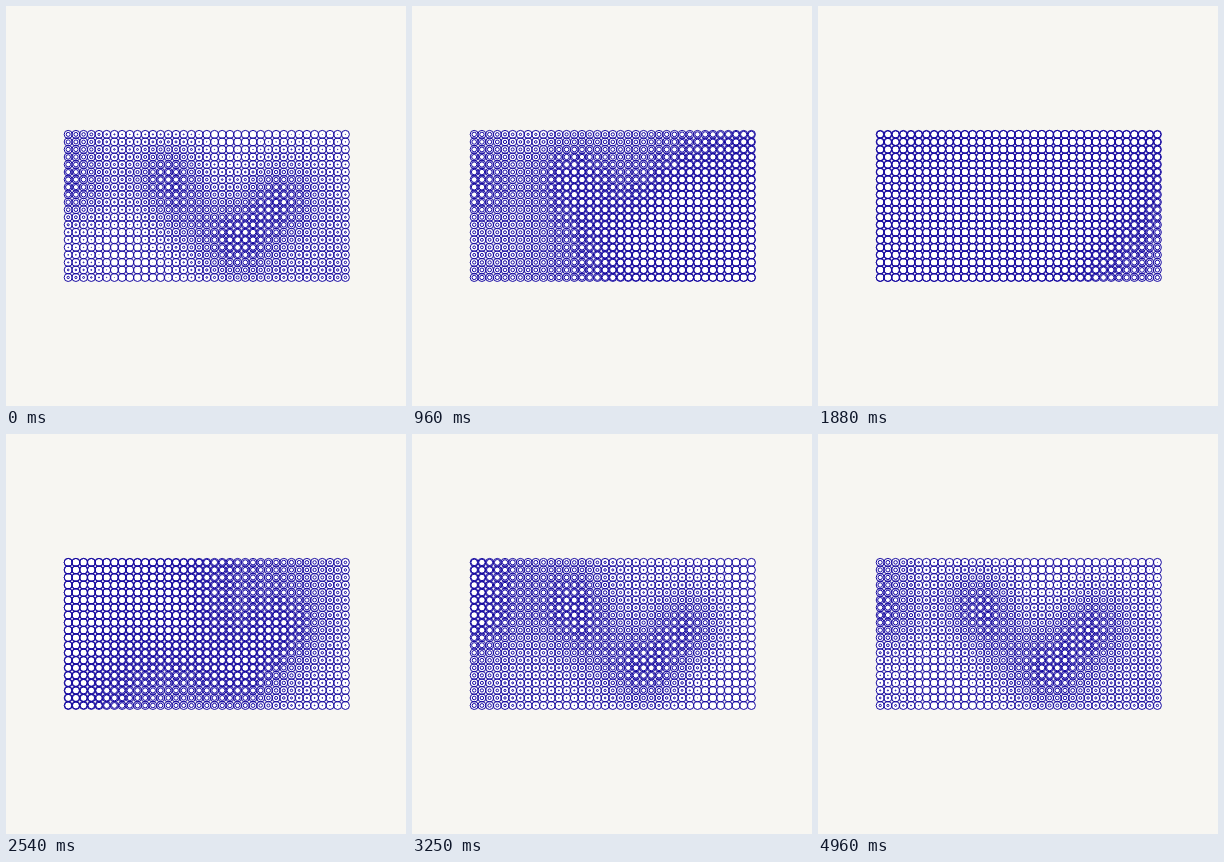
An HTML page with a canvas that plays this animation: 400 px wide and 400 px high, repeating every 5000 ms.

```html
<!DOCTYPE html>
<html lang="en">
<head>
<meta charset="utf-8">
<title>Ring field</title>
<style>
  html, body { margin: 0; width: 100%; height: 100%; overflow: hidden; background: #f7f6f2; }
  canvas { display: block; width: 400px; height: 400px; }
</style>
</head>
<body>
<canvas id="stage" width="400" height="400"></canvas>
<script>
const ctx = document.getElementById('stage').getContext('2d');
const TAU = Math.PI * 2;
const LOOP = 5000;
const COLS = 37, ROWS = 20;
const LEFT = 62.2, TOP = 128.4, DX = 7.7, DY = 7.53;
const RADIUS = 4, REST_MIN = -0.4, REST_MAX = 3, SPREAD = 29;

// Soft hills of the resting ring size
const hills = [
  { x: 64, y: 184, h: 2.8 },
  { x: 64, y: 122, h: 2 },
  { x: 62, y: 296, h: 2.2 },
  { x: 160, y: 169, h: 2.8 },
  { x: 182, y: 215, h: 1.4 },
  { x: 234, y: 239, h: 2.8 },
  { x: 276, y: 191, h: 2.8 }
];

function restSize(x, y) {
  const sum = hills.reduce((total, p) => {
    const d = Math.hypot(x - p.x, y - p.y) / SPREAD;
    return total + p.h * Math.exp(-d * d / 2);
  }, REST_MIN);
  return Math.min(sum, REST_MAX);
}

const cells = [];
for (let j = 0; j < ROWS; j++) {
  for (let i = 0; i < COLS; i++) {
    const x = LEFT + i * DX, y = TOP + j * DY;
    // The swell starts at the bottom right and reaches the top left last
    const peak = 0.21 + 0.205 * (1 - i / (COLS - 1)) + 0.085 * (1 - j / (ROWS - 1));
    cells.push({ x, y, peak, rest: restSize(x, y) });
  }
}

function addCircle(x, y, r) {
  ctx.moveTo(x + r, y);
  ctx.arc(x, y, r, 0, TAU);
}

function ring(x, y, r) {
  ctx.beginPath();
  addCircle(x, y, r);
  ctx.stroke();
}

function draw(t) {
  ctx.fillStyle = '#f7f6f2';
  ctx.fillRect(0, 0, 400, 400);
  ctx.fillStyle = '#ffffff';
  ctx.strokeStyle = '#1508a0';
  ctx.lineWidth = 1;

  ctx.beginPath();
  for (const c of cells) addCircle(c.x, c.y, RADIUS);
  ctx.fill();

  for (const c of cells) {
    const swell = (0.5 + 0.5 * Math.cos(TAU * (t - c.peak))) ** 2;
    const r = c.rest + (RADIUS - c.rest) * swell;
    ring(c.x, c.y, RADIUS);
    if (r > 0) ring(c.x, c.y, r);
  }
}

const start = performance.now();
function tick() {
  draw(((performance.now() - start) % LOOP) / LOOP);
  requestAnimationFrame(tick);
}
tick();
</script>
</body>
</html>
```
